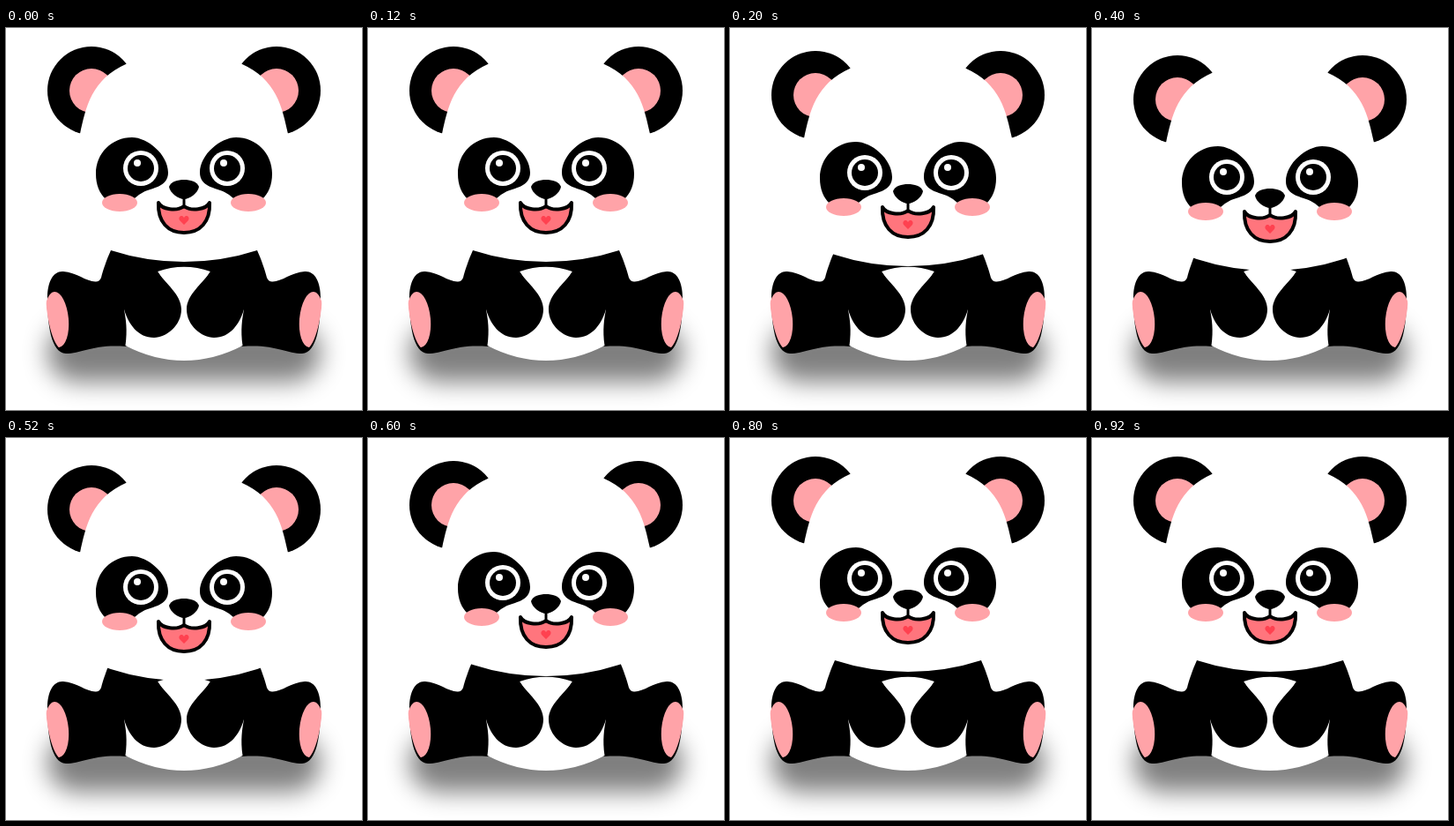
Recreate the animation shown at these times as an HTML page without scripts. Size 404 by 433 pixels, loop 1000 ms.

```html
<!DOCTYPE html>
<html lang="en">
<head>
<meta charset="utf-8">
<title>Nodding panda</title>
<style>
  html, body { margin: 0; width: 100%; height: 100%; overflow: hidden; background: #fff; }
  svg { display: block; width: 404px; height: 433px; }
  .pink { fill: #ffa3a8; }
  .white { fill: #fff; }
  .line { fill: none; stroke: #000; stroke-width: 4; stroke-linecap: round; stroke-linejoin: round; }
  .head { animation: nod 1s step-end infinite; }
  @keyframes nod {
    0%, 80%, 100% { transform: translateY(0); }
    20%, 60% { transform: translateY(5px); }
    40% { transform: translateY(10px); }
  }
</style>
</head>
<body>
<svg viewBox="0 0 404 433">
  <defs>
    <filter id="blur" x="-30%" y="-100%" width="160%" height="300%">
      <feGaussianBlur stdDeviation="14"/>
    </filter>
    <path id="leg" d="M122 245 L119 252 C114 263 110 275 108 283 Q106 287.500 102 287.500 C92 288 80 277 65 276 C54 275 47 287 47 306 C47 336 51 368 68 369 C86 369 100 358 136 361 L202 361 V245 Z"/>
    <clipPath id="legClip"><use href="#leg"/></clipPath>
    <path id="belly" d="M134 319 C136 330 138 342 135.500 360 Q168 377 202 377 T268.500 360 C266 342 268 330 270 319 Z"/>
    <path id="arm" d="M160 262 L172 276 C181 290 199 302 199 319 C199 337 182 351 168 351 C150 351 139 336 134 319 L128 290 Z"/>
    <g id="side">
      <use href="#leg"/>
      <ellipse class="pink" cx="57.500" cy="330.500" rx="13.500" ry="31.500" transform="rotate(-5 57.500 330.500)" clip-path="url(#legClip)"/>
    </g>
    <g id="ear">
      <circle cx="97" cy="71" r="50"/>
      <circle class="pink" cx="97" cy="71" r="25"/>
    </g>
    <g id="face">
      <path d="M102 165 C102 142 120 124 143 124 C160 124 184 143 184 164 C184 180 166 181 156 186 Q150 189 146 193 C136 199 122 203 113 194 C106 187 102 178 102 165 Z"/>
      <ellipse class="pink" cx="129" cy="198" rx="20" ry="10"/>
    </g>
    <g id="eye">
      <circle class="white" r="20"/>
      <circle r="15"/>
      <circle class="white" cx="-4" cy="-6" r="4"/>
    </g>
  </defs>

  <rect x="47" y="335" width="310" height="66" rx="33" opacity=".5" filter="url(#blur)"/>

  <use href="#side"/>
  <use href="#side" transform="matrix(-1 0 0 1 404 0)"/>
  <use href="#belly" class="white"/>
  <path class="white" d="M172 276 Q202 265.500 232 276 L205 319 L240 365 H164 L199 319 Z"/>
  <use href="#arm"/>
  <use href="#arm" transform="matrix(-1 0 0 1 404 0)"/>

  <g class="head">
    <use href="#ear"/>
    <use href="#ear" transform="matrix(-1 0 0 1 404 0)"/>
    <path class="white" d="M84 120 C90.500 90 97 58 137 40.500 Q202 0 267 40.500 C307 58 313.500 90 320 120 C350 190 330 239 285 252 Q245 265 202 265 T119 252 C74 239 54 190 84 120 Z"/>
    <use href="#face"/>
    <use href="#face" transform="matrix(-1 0 0 1 404 0)"/>
    <use href="#eye" x="153" y="159"/>
    <use href="#eye" x="251" y="159"/>
    <path d="M185 180 C187 174 195 172 202 172 S217 174 219 180 C218 187 208 194 202 194 S186 187 185 180 Z"/>
    <path class="line" style="fill:#ff757d" d="M173 198 C177 206 194 208 202 202 C210 208 227 206 231 198 C232 220 220 232 202 232 S172 220 173 198 Z"/>
    <path class="line" style="stroke-width:3" d="M202 192 V203"/>
    <path fill="#ff4150" d="M202 223 L197.500 218.500 C194 214 200 210.500 202 215 C204 210.500 210 214 206.500 218.500 Z"/>
  </g>
</svg>
</body>
</html>
```
